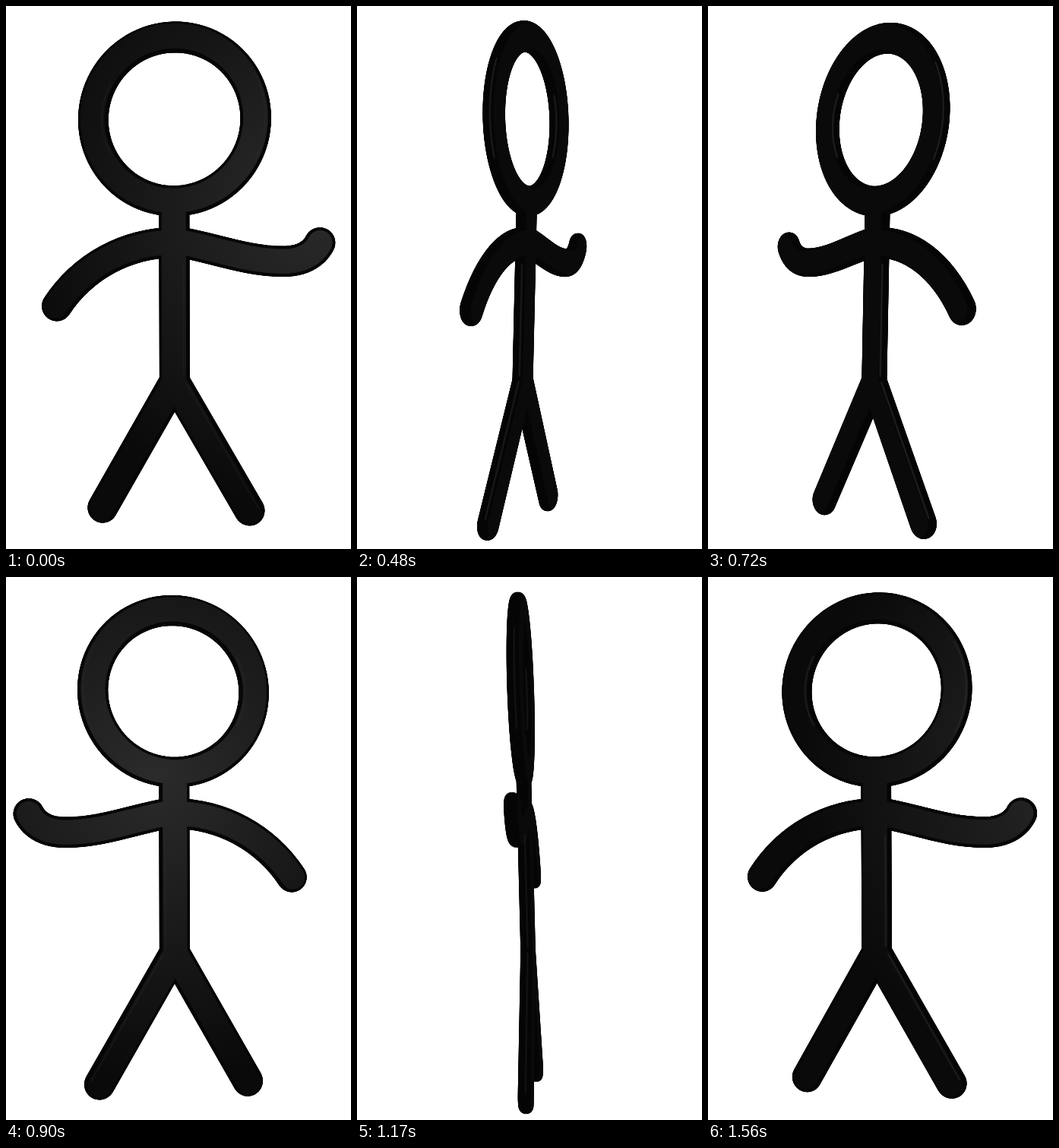
Recreate the animation shown at these times as an HTML page with a canvas. Size 454x714 px, loop 1.59 s.

```html
<!DOCTYPE html>
<html lang="en">
<head>
<meta charset="utf-8">
<title>Turning stick figure</title>
<style>
html, body { margin: 0; width: 100%; height: 100%; overflow: hidden; background: #fff; }
canvas { display: block; width: 454px; height: 714px; }
</style>
</head>
<body>
<canvas id="stage" width="454" height="714"></canvas>
<script>
const ctx = document.getElementById('stage').getContext('2d');
const STEP = 30, STEPS = 53;
const AXIS = 221.5, MID = 357, DIST = 1510;
const HALF = 20, BEVEL = 8, FLAT = 0.4, EDGE = 1.2;
const LAYERS = 12;
const HEAD = { y: 149.5, r: 107 };
const RAD = Math.PI / 180;

let sin = 0, cos = 1;

// Model point (x from the axis, y on stage, z depth) to stage; the figure leans slightly.
function project(x, y, z) {
  z -= (y - 345) * 0.025;
  const k = DIST / (DIST + x * sin - z * cos);
  return [AXIS + (x * cos + z * sin) * k, MID + (y - MID) * k];
}

function bezier(a, b, c, d, n) {
  return Array.from({ length: n + 1 }, (_, i) => {
    const t = i / n, u = 1 - t;
    return [0, 1].map(j => u*u*u*a[j] + 3*u*u*t*b[j] + 3*u*t*t*c[j] + t*t*t*d[j]);
  });
}

const shortArm = Array.from({ length: 17 }, (_, i) => {
  const a = 56.3 * RAD * i / 16;
  return [-188.7 * Math.sin(a), 499.7 - 188.7 * Math.cos(a)];
});
const longArm = [
  ...bezier([0, 309], [60, 320], [95, 336], [143, 336], 12),
  ...bezier([143, 336], [165, 336], [182, 328], [190, 312], 12).slice(1)
];
const limbs = [
  { pts: [[0, 258], [0, 494]], cap: false },
  { pts: [[0, 494], [-96.5, 663]], cap: true },
  { pts: [[0, 494], [98.5, 663]], cap: true },
  { pts: shortArm, cap: true },
  { pts: longArm, cap: true }
];

// Outline of a limb with half width h and a round end.
function outline({ pts, cap }, h) {
  const left = [], right = [], end = [];
  pts.forEach(([x, y], i) => {
    const p = pts[Math.max(0, i - 1)], q = pts[Math.min(pts.length - 1, i + 1)];
    const dir = Math.atan2(q[1] - p[1], q[0] - p[0]);
    const nx = -Math.sin(dir) * h, ny = Math.cos(dir) * h;
    left.push([x + nx, y + ny]);
    right.unshift([x - nx, y - ny]);
    if (cap && i === pts.length - 1) {
      for (let k = 1; k < 16; k++) {
        const a = dir + Math.PI / 2 - Math.PI * k / 16;
        end.push([x + Math.cos(a) * h, y + Math.sin(a) * h]);
      }
    }
  });
  return [...left, ...end, ...right];
}

function circle(r) {
  return Array.from({ length: 96 }, (_, i) => {
    const a = i / 48 * Math.PI;
    return [r * Math.cos(a), HEAD.y + r * Math.sin(a)];
  });
}

function trace(pts, z, closed = true) {
  pts.forEach(([x, y], i) => {
    const p = project(x, y, z);
    i ? ctx.lineTo(...p) : ctx.moveTo(...p);
  });
  if (closed) ctx.closePath();
}

// Slices through the rounded depth, back to front.
const slices = Array.from({ length: 2 * LAYERS + 1 }, (_, i) => {
  const a = (i / LAYERS - 1) * Math.PI / 2;
  const inset = BEVEL * (1 - Math.cos(a));
  const h = HALF - inset - EDGE / 2;
  return {
    z: BEVEL * Math.sin(a) + FLAT * Math.sign(i - LAYERS),
    inset,
    limbs: limbs.map(l => outline(l, h)),
    rings: [circle(HEAD.r + h), circle(HEAD.r - h)]
  };
});

function paint(slice, color) {
  ctx.fillStyle = ctx.strokeStyle = color;
  ctx.lineWidth = EDGE;
  ctx.lineJoin = 'round';
  for (const pts of slice.limbs) {
    ctx.beginPath();
    trace(pts, slice.z);
    ctx.fill();
    ctx.stroke();
  }
  ctx.beginPath();
  slice.rings.forEach(r => trace(r, slice.z));
  ctx.fill('evenodd');
  ctx.stroke();
}

// Soft sheen that slides across the flat side as it turns.
function faceColor(angle) {
  const tilt = Math.atan(Math.tan(angle)) / RAD;
  const x = AXIS + (5 - tilt) * 18;
  const g = ctx.createRadialGradient(x, 260, 0, x, 260, 400);
  g.addColorStop(0, '#2b2b2b');
  g.addColorStop(0.5, '#1a1a1a');
  g.addColorStop(1, '#0a0a0a');
  return g;
}

// Soft glints on the rounded edges that face the viewer.
function glints() {
  const near = -Math.sign(sin);
  const off = HALF - BEVEL + BEVEL * Math.abs(sin);
  const z = FLAT * Math.sign(cos) + BEVEL * cos;
  const lines = [[[near * off, 340], [near * off, 485]]];
  const side = near > 0 ? 98.5 : -96.5;
  const nx = near * off * 0.866, ny = -off * 0.5;
  lines.push([[side * 0.05 + nx, 502 + ny], [side + nx, 663 + ny]]);
  for (const s of [1, -1]) {
    const r = HEAD.r + s * off;
    lines.push(Array.from({ length: 13 }, (_, i) => {
      const a = (i / 6 - 1) * 0.5;
      return [s * near * r * Math.cos(a), HEAD.y + r * Math.sin(a)];
    }));
  }
  const strength = Math.min(1, 3 * Math.abs(sin)) * (0.3 + 0.5 * Math.abs(cos));
  ctx.strokeStyle = '#303030';
  ctx.lineCap = 'round';
  for (const [width, alpha] of [[3.5, 0.4], [1.5, 0.8]]) {
    ctx.lineWidth = width;
    ctx.globalAlpha = strength * alpha;
    for (const l of lines) {
      ctx.beginPath();
      trace(l, z, false);
      ctx.stroke();
    }
  }
  ctx.globalAlpha = 1;
}

// One eased turn, fastest near the back view.
const turn = step => (187.3 * (1 - Math.cos((7.5 + 2.81 * step) * RAD)) - 6.8) * RAD;

function draw(step) {
  const angle = turn(step);
  sin = Math.sin(angle);
  cos = Math.cos(angle);
  ctx.fillStyle = '#fff';
  ctx.fillRect(0, 0, 454, 714);
  const face = faceColor(angle);
  const order = cos > 0 ? slices : [...slices].reverse();
  order.forEach((s, i) => paint(s, i > LAYERS && s.inset > 3.5 ? face : '#060606'));
  glints();
}

let start = null, shown = 0;
draw(0);
function tick(now) {
  if (start === null) start = now;
  const step = Math.floor(Math.max(0, now - start) / STEP) % STEPS;
  if (step !== shown) draw(shown = step);
  requestAnimationFrame(tick);
}
requestAnimationFrame(tick);
</script>
</body>
</html>
```
